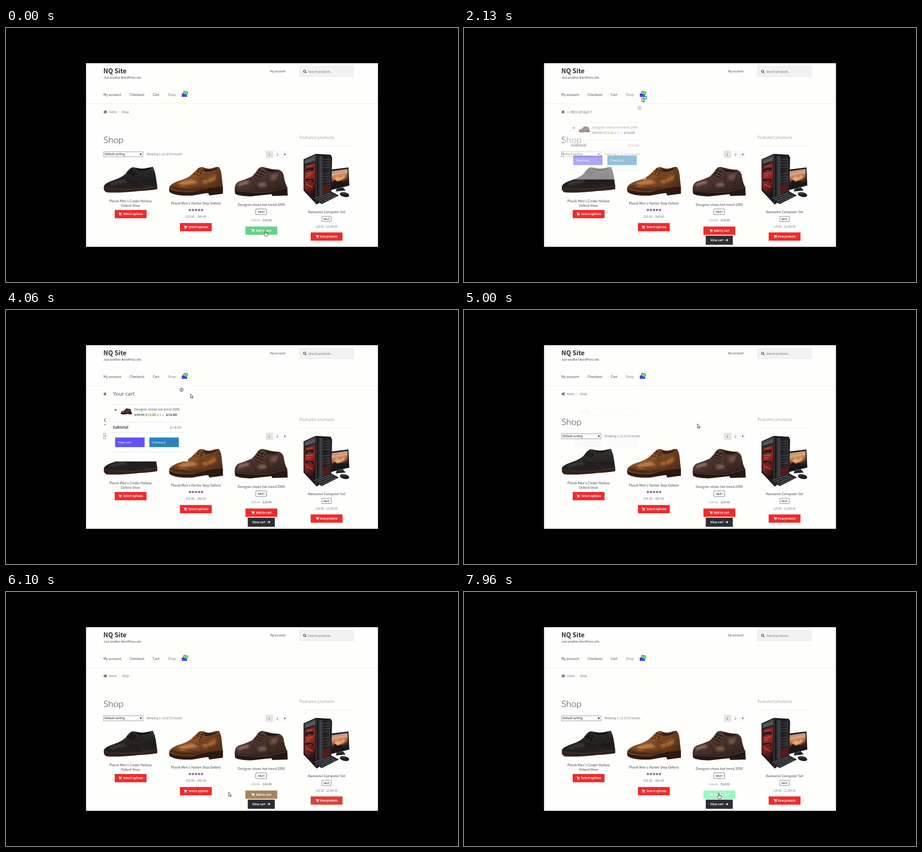
Write an HTML page that moves like this. It is 998x561 px and loops after 8 s.

```html
<!DOCTYPE html>
<html lang="en">
<head>
<meta charset="utf-8">
<title>Shop</title>
<style>
html, body { margin: 0; width: 100%; height: 100%; overflow: hidden; background: #000; }
svg { display: block; width: 100%; height: 100%; }
text { font: 6.45px "Noto Sans CJK SC", "Noto Sans CJK JP", "Noto Sans CJK", "Open Sans", sans-serif; fill: #6d6d6d; }
.mid { text-anchor: middle; }
.nav { font-size: 7.4px; fill: #404248; }
.dark { fill: #404248; }
.light { font-family: Lato, "Open Sans", sans-serif; font-weight: 300; }
.btn { font-size: 6.3px; font-weight: 600; fill: #fff; }
.soft { filter: url(#soft); }
#popup text { font: 7px "Open Sans", "Noto Sans", sans-serif; fill: #43454b; }
#popup .bold { font-weight: 700; }
#popup .big { font-size: 8px; }
#popup .white { fill: #fff; }
</style>
</head>
<body>
<svg viewBox="0 0 998 561" xmlns="http://www.w3.org/2000/svg">
<defs>
  <filter id="soft" x="-50%" y="-50%" width="200%" height="200%"><feGaussianBlur stdDeviation="2"/></filter>
  <linearGradient id="black" x2="0" y2="1"><stop stop-color="#2f2d2c"/><stop offset=".6" stop-color="#1f1d1c"/><stop offset="1" stop-color="#262220"/></linearGradient>
  <linearGradient id="tan" x2="1" y2=".5"><stop stop-color="#5f3819"/><stop offset=".45" stop-color="#86502a"/><stop offset="1" stop-color="#55301a"/></linearGradient>
  <linearGradient id="brown" x2=".7" y2="1"><stop stop-color="#5b443b"/><stop offset=".55" stop-color="#4a332c"/><stop offset="1" stop-color="#32221d"/></linearGradient>
  <linearGradient id="glow" x2=".3" y2="1"><stop stop-color="#3a2020"/><stop offset=".45" stop-color="#9c2a22"/><stop offset=".75" stop-color="#6d1d19"/><stop offset="1" stop-color="#211315"/></linearGradient>
  <linearGradient id="front" x2="1" y2="0"><stop stop-color="#0e0e10"/><stop offset=".3" stop-color="#45454b"/><stop offset=".5" stop-color="#1c1c1f"/><stop offset="1" stop-color="#2d2d31"/></linearGradient>
  <linearGradient id="blast" x2=".2" y2="1"><stop stop-color="#8e7469"/><stop offset=".35" stop-color="#d9a787"/><stop offset=".55" stop-color="#b8623a"/><stop offset=".75" stop-color="#4c2c22"/><stop offset="1" stop-color="#1d1614"/></linearGradient>
  <g id="trolley" fill="#fff">
    <path d="M0 0h1.6l.4.9h5.4l-.7 3H2.7l.2.8h3.8v.7H2.2L1.1.7H0z"/>
    <circle cx="2.9" cy="6.2" r=".8"/><circle cx="6.2" cy="6.2" r=".8"/>
  </g>
  <g id="derby">
    <path d="M505 358Q504 344 514 339Q530 334 543 328Q551 320 557 311Q562 306 568 307L580 310Q592 313 602 313Q610 315 613 324Q615 339 620 350V361L506 366Z" fill="url(#brown)"/>
    <path class="soft" d="M512 345Q524 338 537 338L535 344Q522 345 513 350Z" fill="#94776a"/>
    <path class="soft" d="M556 345Q566 337 574 341L576 349Q565 353 557 350Z" fill="#765a4e"/>
    <path class="soft" d="M585 325Q595 321 602 322L596 336L584 336Z" fill="#6c5146"/>
    <path d="M570 309Q584 314 604 313Q594 322 576 317Z" fill="#2a1c19"/>
    <path d="M505 357Q545 363 580 360L621 350L622 370L588 371L586 367L540 372Q512 371 506 366Z" fill="#241815"/>
    <path d="M506 359Q545 365 581 362L621 352" fill="none" stroke="#7b5845" stroke-width=".9"/>
    <path d="M537 333Q551 341 553 360M578 319Q572 338 583 360M546 328Q560 341 576 342M607 319Q596 334 598 351" fill="none" stroke="#2a1b17" stroke-width=".9"/>
    <path d="M549 324L565 330M553 319L569 325M557 314L573 320M561 310L555 323M567 315L560 329" stroke="#1f1512" stroke-width="1.4"/>
    <path d="M551 322L565 327M555 317L570 322" stroke="#87695a" stroke-width=".6"/>
  </g>
</defs>

<rect width="998" height="561"/>
<rect x="176.7" y="77.7" width="644.6" height="405.6" fill="#fefefd"/>

<!-- header -->
<text x="215" y="100" style="font-size:14px;font-weight:700;fill:#2c2d33">NQ Site</text>
<text x="215" y="112.3" class="dark">Just another WordPress site</text>
<text x="583" y="97.7" class="dark">My account</text>
<rect x="648" y="84.5" width="119.5" height="23" fill="#f2f2f3" stroke="#e4e4e5" stroke-width=".7"/>
<circle cx="659.2" cy="95.4" r="2.4" fill="none" stroke="#43454b" stroke-width="1.2"/>
<path d="M661 97.2l2.2 2.2" stroke="#43454b" stroke-width="1.4"/>
<text x="667" y="98.8">Search products...</text>
<text x="215" y="149.6" class="nav">My account</text>
<text x="272.7" y="149.6" class="nav">Checkout</text>
<text x="324" y="149.6" class="nav">Cart</text>
<text x="357" y="149.6" class="nav" style="fill:#7c7d81">Shop</text>
<path d="M390.5 146L393 140h2l2.5 6" fill="none" stroke="#4b2ee0" stroke-width="1.3"/>
<path d="M387.8 145h12.4v1.8h-.7l.5 5.2h-12l.5-5.2h-.7z" fill="#4b2ee0"/>
<path d="M388 149.6h12" stroke="#8d7cf2" stroke-width=".6"/>
<circle cx="398" cy="143.4" r="4.4" fill="#42dc5c"/>
<text id="count" x="398" y="145.3" class="mid" style="font-size:4.8px;fill:#d8ffdf">0</text>
<path d="M177 167h644" stroke="#ededec"/>
<path d="M214.8 185.2l4.2-3.7 1.6 1.4v-1h1.2v2l1.5 1.3-.5.6-3.8-3.3-3.8 3.3zM216.2 185.6l2.8-2.4 2.8 2.4v2.8h-2v-2h-1.6v2h-2z" fill="#55565b"/>
<text x="227" y="187.5">Home</text>
<path d="M249.3 183l1.6 2-1.6 2" fill="none" stroke="#c5c5c5" stroke-width=".7"/>
<text x="256" y="187.5">Shop</text>

<!-- list head -->
<text x="215" y="254" class="light" style="font-size:20.4px;fill:#33343a">Shop</text>
<rect x="215.5" y="273.5" width="87" height="11" fill="#fff" stroke="#8d8d8d" stroke-width=".9"/>
<text x="217.8" y="281.4" style="fill:#111">Default sorting</text>
<path d="M295.3 277.2h4.6l-2.3 4z" fill="#111"/>
<text x="310" y="281.4">Showing 1–12 of 13 results</text>
<rect x="573.2" y="271" width="16.6" height="16" fill="#e4e4e3"/>
<rect x="591.2" y="271" width="16" height="16" fill="#f9f9f9"/>
<rect x="608.4" y="271" width="15" height="16" fill="#f9f9f9"/>
<text x="581.5" y="281.5" class="mid dark">1</text>
<text x="599.3" y="281.5" class="mid dark">2</text>
<path d="M614.6 276.6v4.8l3-2.4z" fill="#43454b"/>

<!-- suede shoe -->
<path d="M216 350Q217 343 238 336Q254 331 264 322Q271 311 279 307.5L290 309Q302 312 312 309L324 306.5Q329 315 331 329L334 350L310 357H217Z" fill="url(#black)"/>
<path class="soft" d="M228 343Q248 335 262 334L268 341Q248 343 232 348Z" fill="#3b3836"/>
<path d="M286 310Q304 313 322 307.5Q311 317 293 315Z" fill="#100f0f"/>
<path d="M318 308l6-1.5 3 8-4 1z" fill="#2e3547"/>
<path d="M216 351Q250 356 285 354L334 347V356Q316 359 294 360Q250 365 222 363Q215 360 216 351Z" fill="#30221d"/>
<path d="M217 353Q260 358 297 355L333 349" fill="none" stroke="#5b463c" stroke-width=".7"/>
<path d="M263 324Q275 335 292 335Q306 331 311 318M292 335Q298 346 313 351" fill="none" stroke="#45413e" stroke-width=".7"/>
<path d="M268 318l14 7M272 313l15 8M278 310l-3 12M285 313l-4 13" stroke="#090909" stroke-width="1.4"/>

<!-- tan shoe -->
<path d="M360 354Q361 345 380 338Q402 332 412 322L424 310Q430 305 437 308Q447 313 457 309Q465 306 470 307Q475 313 476 325L479 354L445 365L372 367Q360 364 360 354Z" fill="url(#tan)"/>
<path class="soft" d="M380 343Q397 335 413 335L425 343Q405 343 388 350Z" fill="#bd7c44"/>
<path class="soft" d="M433 337Q450 330 462 322L464 334Q450 343 436 344Z" fill="#a4662f"/>
<path class="soft" d="M362 353Q372 360 402 361L436 358L436 353Q400 357 366 349Z" fill="#452712"/>
<path class="soft" d="M414 326l10-9 5 6-8 9z" fill="#a0622f"/>
<path d="M434 309Q450 315 469 307Q459 319 440 318Z" fill="#3b2113"/>
<path d="M360 355Q372 363 412 363L449 353L479 350V366L449 370L446 364L412 370Q374 372 361 362Z" fill="#2c1a11"/>
<path d="M362 352Q382 343 406 349Q424 356 444 351M412 322Q428 336 445 333Q462 328 468 314M445 333Q446 345 453 351" fill="none" stroke="#472711" stroke-width=".9"/>
<path d="M414 321l15 6M419 316l15 6M424 311l14 6M427 310l-6 15M434 312l-7 15" stroke="#372013" stroke-width="1.3"/>

<use href="#derby"/>

<!-- product texts -->
<g class="mid">
  <text x="275" y="385.3" class="nav">Plovik Men's Cinder Hollow</text>
  <text x="275" y="395.3" class="nav">Oxford Shoe</text>
  <text x="419" y="390.4" class="nav">Plovik Men's Harlen Step Oxford</text>
  <text x="419" y="419.4">$33.00 – $66.00</text>
  <text x="563.7" y="392.6" class="nav">Designer shoes hot trend 2090</text>
  <text x="563.5" y="408.4" class="dark" style="font-size:5.4px;font-weight:600">SALE!</text>
  <text x="551" y="427" style="fill:#b8b8b8">$30.00</text>
  <text x="576.7" y="427" class="dark">$14.00</text>
</g>
<path d="M540.8 424.8h20.4" stroke="#b0b0b0" stroke-width=".7"/>
<rect x="551.5" y="399.5" width="24" height="12.6" rx="1.4" fill="none" stroke="#55565b" stroke-width=".8"/>
<g id="stars" fill="#7f5086"></g>

<!-- sidebar -->
<text x="648" y="245" class="light" style="font-size:9.75px">Featured products</text>
<path d="M648 260.5h120" stroke="#ededec"/>
<path d="M715 313L756 308L758 348L717 358Z" fill="#17171a"/>
<path d="M718 316L754 311L755 341L719 349Z" fill="url(#blast)"/>
<path class="soft" d="M724 332l8-5 6 3 8-6 4 6-12 8-12 1z" fill="#f0b070"/>
<path d="M721 341l6-6 5 5 7-3 6 2-5 5-18 4z" fill="#1d1614"/>
<path d="M730 355l14-3 6 7-22 2z" fill="#26262a"/>
<path d="M657 290L684 278L717 280L720 286L718 367L686 390L657 359Z" fill="#1b1b1e"/>
<path d="M659 303L682 297V379L659 355Z" fill="url(#glow)"/>
<path d="M659 291L683 281V294L659 301Z" fill="#4a4a50"/>
<path d="M661 312l18-4v7l-18 3zM661 333l18 1v7l-18-3z" fill="#241414"/>
<path d="M663 307l14-3M662 322l15-2M663 345l14 7M663 327l8-1" stroke="#d2594b" stroke-width="1.4"/>
<path d="M662 296l19-7M665 316l9-2M666 337l10 1" stroke="#8b8487" stroke-width="1"/>
<path d="M686 282L717 284V364L686 386Z" fill="url(#front)"/>
<path d="M685 281V386" stroke="#77777d" stroke-width=".8"/>
<path d="M699 290l16-.5M699 296l16-.5M699 302l16-.5M699 308l16-.5M699 322l16-1M699 328l16-1M699 334l16-1M699 340l16-2" stroke="#55555c" stroke-width="1"/>
<path d="M699 348l15-3v15l-15 8z" fill="#571a18"/>
<path d="M677 376L718 361L735 370L697 389Z" fill="#202024"/>
<path d="M681 376.5L716 364M686 379.5L721 366M691 382.5L726 368.5M696 385.5L730 370.5" stroke="#a3a3aa" stroke-width="1.2" stroke-dasharray="1.6 1"/>
<ellipse cx="747.5" cy="368" rx="10.5" ry="5.2" fill="#202024" transform="rotate(12 747.5 368)"/>
<path d="M740 366q5-3 10 0" fill="none" stroke="#85858c" stroke-width=".8"/>
<g class="mid">
  <text x="707.7" y="409.4" class="nav">Awesome Computer Set</text>
  <text x="707.8" y="424" class="dark" style="font-size:5px;font-weight:600">SALE!</text>
  <text x="708" y="440.6" style="font-size:5.65px">$29.00 – $2,300.00</text>
</g>
<rect x="697.3" y="416" width="21" height="11.6" rx="1.4" fill="none" stroke="#55565b" stroke-width=".8"/>

<g id="buttons"></g>
<g id="viewCart">
  <rect x="533.8" y="458.6" width="59.7" height="20.2" fill="#2c2d33"/>
  <text x="544" y="471" class="btn" style="font-weight:700">View cart</text>
  <path d="M576 468.5h6.2M580 466l2.6 2.5-2.6 2.5" fill="none" stroke="#fff" stroke-width="1.2"/>
</g>

<!-- mini cart -->
<g id="popup">
  <rect x="221" y="166" width="181" height="168.5" fill="#fefefd"/>
  <text x="236" y="189.2" style="font-size:11.5px">Your cart</text>
  <circle cx="387.6" cy="176.3" r="4.6" fill="#a2a2a2"/>
  <path d="M385 176.3h5.2" stroke="#fff" stroke-width="1.4"/>
  <path d="M231 208.5h161M231 247.5h161M231 270.8h161M231 313.5h161" stroke="#e2e2e2" stroke-width=".9"/>
  <path d="M240.2 218.8l3.8 3.8m0-3.8l-3.8 3.8" stroke="#33343a" stroke-width="1.1"/>
  <use href="#derby" transform="translate(149.5 154) scale(.206)"/>
  <text x="283" y="222.3">Designer shoes hot trend 2090</text>
  <rect x="307.6" y="226" width="23.2" height="9.6" fill="#fdfbd6"/>
  <text x="283" y="233.6" style="font-size:7.4px">$30.00</text>
  <text x="307.8" y="233.6" style="font-size:7.4px">$14.00</text>
  <text x="333" y="233.6" style="font-size:7.4px">x 1 =</text>
  <text x="353" y="233.6" class="bold" style="font-size:7.8px">$14.00</text>
  <path d="M283 231.2h23" stroke="#43454b" stroke-width=".7"/>
  <text x="236" y="262.2" class="bold big">Subtotal</text>
  <text x="362" y="262.2" class="big" style="fill:#6d6d6d">$14.00</text>
  <rect x="241" y="281.6" width="65" height="21.2" fill="#6153f7"/>
  <rect x="316.5" y="281.6" width="65" height="21.2" fill="#2a83be"/>
  <text x="247" y="295.2" class="white">View cart</text>
  <text x="322" y="295.2" class="white">Checkout</text>
</g>

<g id="cursor" fill="#fff" stroke="#111" stroke-width=".8" stroke-linejoin="round">
  <path id="arrow" d="M0 0V9.2L2.1 7.3L3.6 10.6L4.9 10L3.5 6.9H6.2Z"/>
  <g id="hand">
    <path d="M-1 1Q0-.7 1 1V5L5 5.8Q6.1 6.3 5.9 8L5 12.6H-.4L-3 8.6Q-3.2 7-1.8 7.2L-1 8Z"/>
    <path d="M1 5v1.8M2.8 5.4v1.6M4.4 5.8v1.4" stroke-width=".6"/>
  </g>
  <circle id="busy" cx="7" cy=".4" r="3" stroke="#2b8fe0" stroke-width="2.2"/>
</g>
</svg>
<script>
const LOOP = 8000;
const $ = id => document.getElementById(id);
const RED = [240, 43, 43], GREEN = [74, 242, 149];

// Each key is [time, value, ...]; values run straight from key to key.
function track(keys, t) {
  const i = keys.findIndex(k => k[0] > t);
  if (i === 0) return keys[0].slice(1);
  if (i < 0) return keys[keys.length - 1].slice(1);
  const a = keys[i - 1], b = keys[i], p = (t - a[0]) / (b[0] - a[0]);
  return a.slice(1).map((v, j) => v + (b[j + 1] - v) * p);
}

const buttons = [
  { x: 240, y: 402, label: 'Select options', icon: 8.3, dx: 18.7, hover: [[0, 0]] },
  { x: 384, y: 430.7, label: 'Select options', icon: 8.3, dx: 18.7, hover: [[6250, 0], [6310, .3], [6380, 0]] },
  { x: 528.7, y: 438.5, label: 'Add to cart', icon: 13, dx: 23.3, hover: [[0, .85], [100, 1], [1520, 1], [1780, 0],
    [5900, 0], [5985, .8], [6240, 0], [7000, 0], [7260, 1]] },
  { x: 672.7, y: 451.5, label: 'View products', icon: 11, dx: 20.3, size: 5.6,
    hover: [[5450, 0], [5650, 1], [5860, 1], [6130, 0]] }
];
const fade = [[410, 1], [680, .5], [1000, .5], [1170, 1], [7680, 1], [7940, .55]];
const popup = [[1960, 0], [2300, 1], [4620, 1], [4900, .05], [5100, 0]];
const path = [
  [0, 572.5, 447], [1240, 572.5, 447], [1380, 535, 385], [1510, 482.7, 313], [1700, 425, 225],
  [1930, 394, 150], [2060, 393, 150], [2300, 393, 163], [2960, 393, 163], [3120, 450, 220],
  [3380, 569, 346], [3520, 562, 335], [3770, 513, 269], [3920, 450, 215], [4060, 407.3, 185],
  [4280, 387, 174], [4620, 387, 174], [4800, 435, 200], [5000, 515, 251], [5200, 610, 345],
  [5420, 684, 445], [5520, 688, 456], [5800, 678, 456], [5950, 560, 450], [6100, 492, 442],
  [6220, 445, 436], [6300, 440, 432], [6370, 440, 427], [6580, 440, 427], [6860, 568, 433],
  [7000, 568, 435], [7300, 562.5, 444]
];

buttons.forEach((b, i) => {
  $('buttons').innerHTML += `<g id="b${i}"><rect x="${b.x}" y="${b.y}" width="70.3" height="18.2"/>
    <use href="#trolley" x="${b.x + b.icon}" y="${b.y + 5.6}"/>
    <text class="btn" x="${b.x + b.dx}" y="${b.y + 11.3}" style="font-size:${b.size || 6.3}px">${b.label}</text></g>`;
});

for (let i = 0; i < 5; i++) {
  const pts = Array.from({ length: 10 }, (_, k) => {
    const a = k * Math.PI / 5, r = k % 2 ? 1.6 : 3.6;
    return [406 + i * 6.7 + r * Math.sin(a), 402 - r * Math.cos(a)].map(v => v.toFixed(2));
  });
  $('stars').innerHTML += `<polygon points="${pts.join(' ')}"/>`;
}

const inside = (x, y, l, t, w, h) => x >= l && x <= l + w && y >= t && y <= t + h;
const show = (id, on) => $(id).setAttribute('visibility', on ? 'visible' : 'hidden');

function draw(t) {
  buttons.forEach((b, i) => {
    const [p] = track(b.hover, t);
    const rgb = RED.map((v, j) => Math.round(v + (GREEN[j] - v) * p));
    $('b' + i).firstElementChild.setAttribute('fill', `rgb(${rgb})`);
  });
  $('b2').setAttribute('opacity', track(fade, t)[0]);

  const added = t >= 1000;
  show('viewCart', added);
  $('count').textContent = added ? 1 : 0;

  const [open] = track(popup, t);
  $('popup').setAttribute('opacity', open);

  const [x, y] = track(path, t);
  const hand = buttons.some(b => inside(x, y, b.x, b.y, 70, 18))
    || inside(x, y, 387, 139, 14, 13)
    || open > .9 && inside(x, y, 383, 171, 9, 9);
  $('cursor').setAttribute('transform', `translate(${x} ${y})`);
  show('hand', hand);
  show('arrow', !hand);
  show('busy', !hand && t > 2060 && t < 3000);
}

function tick(now) {
  draw(now % LOOP);
  requestAnimationFrame(tick);
}
draw(0);
requestAnimationFrame(tick);
</script>
</body>
</html>
```
